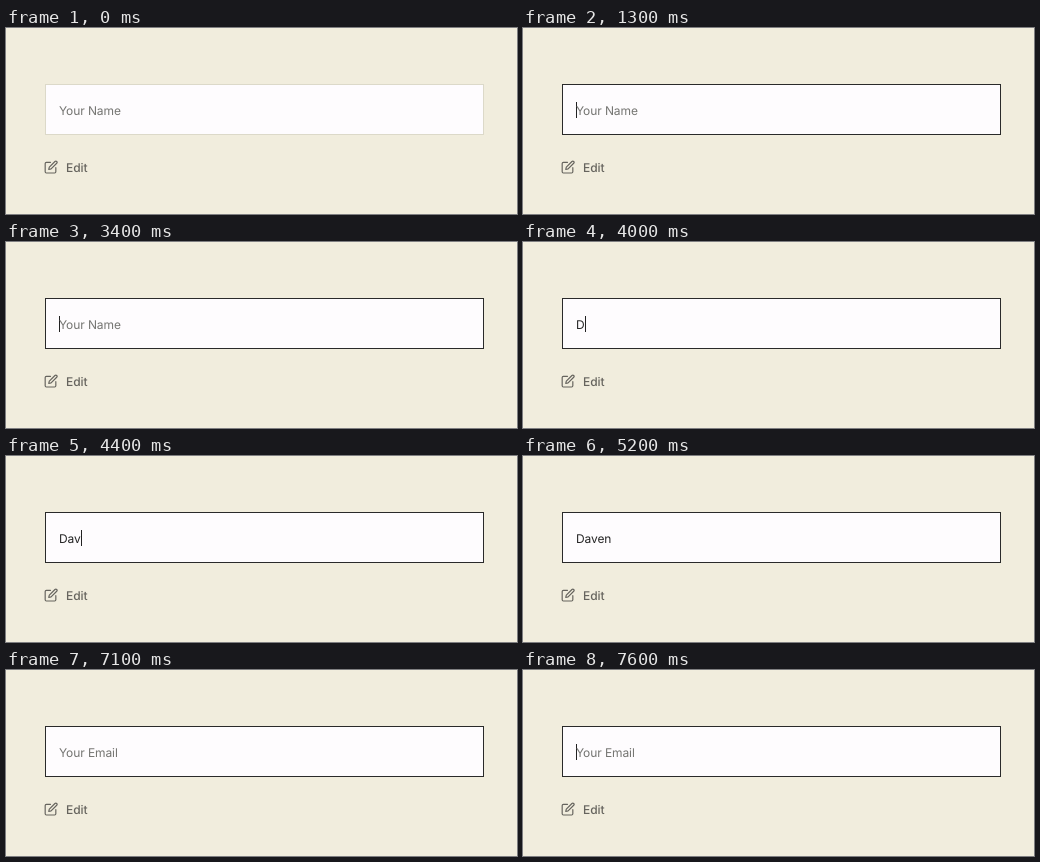
Recreate the animation shown at these times as an HTML page. Size 511x186 px, loop 8 s.

```html
<!DOCTYPE html>
<html lang="en">
<head>
<meta charset="utf-8">
<title>Form field</title>
<style>
  html, body { margin: 0; width: 100%; height: 100%; overflow: hidden; background: #f1eddd; }
  body {
    position: relative; font: 12px/16px Inter, sans-serif;
    letter-spacing: -0.1px; text-rendering: geometricPrecision;
  }
  #field {
    position: absolute; left: 39px; top: 56px; width: 437px; height: 49px;
    border: 1px solid #dcd9c9; background: #fefcfe;
  }
  #field.focus { border-color: #2a2a2a; }
  #line {
    position: absolute; left: 53px; top: 74px; height: 16px;
    display: flex; white-space: pre; color: #252525;
  }
  #line.empty { color: #757572; }
  #text { position: relative; top: 1px; }
  #caret { width: 1px; height: 16px; margin-right: -1px; background: #222; }
  #line.empty #caret { order: -1; }
  #edit { position: absolute; left: 60px; top: 132px; font-weight: 500; color: #66645e; }
  svg { position: absolute; left: 38.4px; top: 132px; }
</style>
</head>
<body>
<div id="field"></div>
<div id="line"><span id="text"></span><span id="caret"></span></div>
<svg width="14.2" height="14.2" viewBox="0 0 24 24" fill="none" stroke="#66645e"
     stroke-width="2" stroke-linecap="round" stroke-linejoin="round">
  <path d="M11 4H4a2 2 0 0 0-2 2v14a2 2 0 0 0 2 2h14a2 2 0 0 0 2-2v-7"/>
  <path d="M18.5 2.5a2.1 2.1 0 0 1 3 3L12 15l-4 1 1-4z"/>
</svg>
<div id="edit">Edit</div>
<script>
  const LOOP = 8000, FOCUS = 1300, NEXT = 5500;
  const NAME = "Daven";
  const keys = [4000, 4200, 4400, 4500, 4700];
  const blinks = [1300, 1800, 2300, 2800, 3400, 3900, 4000, 5200, 5500, 6100, 6600, 7100, 7600];
  const $ = id => document.getElementById(id);
  const passed = (times, t) => times.filter(x => x <= t).length;

  function draw(t) {
    const typed = t < NEXT ? NAME.slice(0, passed(keys, t)) : "";
    $("text").textContent = typed || (t < NEXT ? "Your Name" : "Your Email");
    $("line").className = typed ? "" : "empty";
    $("field").className = t < FOCUS ? "" : "focus";
    $("caret").style.visibility = passed(blinks, t) % 2 ? "visible" : "hidden";
  }

  const start = performance.now();
  function tick() {
    draw((performance.now() - start) % LOOP);
    requestAnimationFrame(tick);
  }
  draw(0);
  requestAnimationFrame(tick);
</script>
</body>
</html>
```
